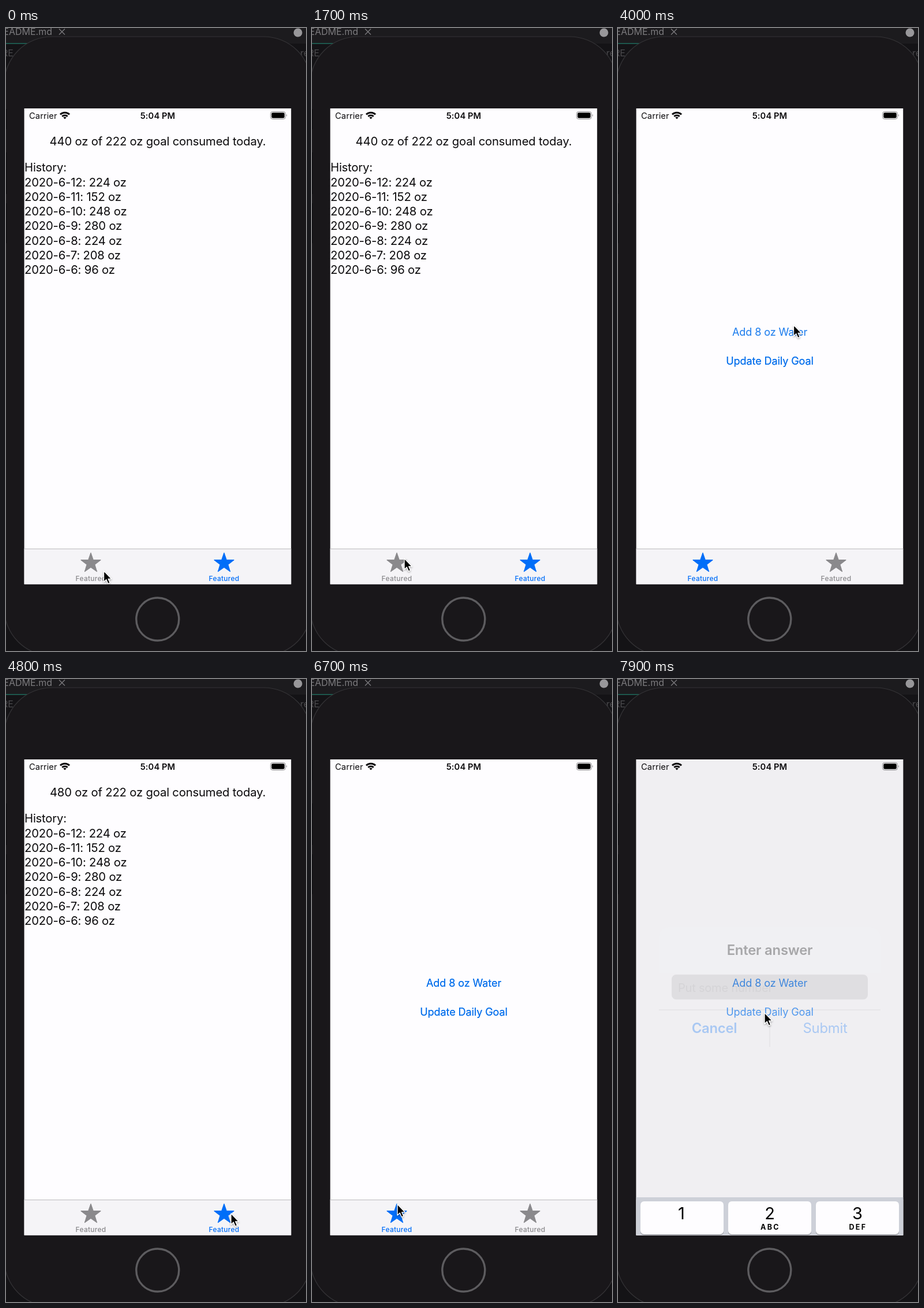
Animation, 520 px wide and 1077 px high, one loop 8 s. Source, as an HTML page:

```html
<!DOCTYPE html>
<html lang="en">
<head>
<meta charset="utf-8">
<title>Water tracker</title>
<style>
  html, body { margin: 0; width: 100%; height: 100%; overflow: hidden; background: #19181b; }
  svg { display: block; width: 520px; height: 1077px; font-family: Inter, Roboto, "Liberation Sans", sans-serif; }
  .body { font-size: 20.3px; letter-spacing: -.19px; fill: #0b0a0c; }
  .mid { text-anchor: middle; }
  .button { font-size: 18.1px; letter-spacing: -.12px; fill: #0a72ec; }
  .status { font-size: 14.7px; letter-spacing: .08px; fill: #0b0a0c; }
  .tab text { font-size: 12px; font-weight: 500; letter-spacing: .25px; }
  .editor { font-size: 16px; }
  .alert text { font-size: 23.8px; letter-spacing: -.2px; }
  .strong { font-weight: 600; }
  .digit { font-size: 29px; }
  .letters { font-size: 12.5px; font-weight: 700; letter-spacing: 2.4px; }
</style>
</head>
<body>
<svg viewBox="0 0 520 1077">
  <defs>
    <filter id="soft" x="-60%" y="-40%" width="240%" height="200%">
      <feDropShadow dx="0" dy="1.5" stdDeviation="1.4" flood-opacity=".35"/>
    </filter>
    <clipPath id="screen"><rect x="31.6" y="139" width="462.6" height="822.4"/></clipPath>
  </defs>

  <!-- editor behind the phone -->
  <rect width="520" height="1077" fill="#141316"/>
  <rect width="520" height="27" fill="#1c1b1e"/>
  <rect y="26" width="40" height="1.5" fill="#1f6a5c"/>
  <g class="editor">
    <text x="80" y="12" text-anchor="end" fill="#7c7b7e">README.md</text>
    <text x="-7" y="49" fill="#4b4a4d">RE</text>
    <text x="510" y="49" fill="#4b4a4d">re</text>
  </g>
  <path d="M92 1.5l10 10m0-10l-10 10" stroke="#7c7b7e" stroke-width="1.3"/>
  <circle cx="506" cy="8" r="7.5" fill="#98979a"/>

  <!-- phone -->
  <rect x="-3" y="15" width="532" height="1070" rx="82" fill="#19171a" stroke="#343336" stroke-width="1.2"/>
  <path d="M.5 140v35M.5 215v72M.5 303v69" stroke="#0d0c0f" stroke-width="1.5"/>
  <circle cx="262.8" cy="1022" r="37" fill="none" stroke="#5d5c5f" stroke-width="3.4"/>

  <g clip-path="url(#screen)">
    <rect x="31" y="139" width="464" height="823" fill="#fefdff"/>
    <g id="history">
      <text id="total" class="body mid" x="263" y="203.3"></text>
    </g>
    <g id="actions" class="button mid">
      <text id="add" x="263" y="532.3">Add 8 oz Water</text>
      <text id="goal" x="263" y="581.5">Update Daily Goal</text>
    </g>
    <rect x="31" y="900" width="464" height="62" fill="#f5f4f7"/>
    <rect x="31" y="900" width="464" height="1" fill="#bbbabd"/>
    <g id="tabs"></g>

    <g id="modal">
      <rect x="31" y="139" width="464" height="823" fill="#f0eff2"/>
      <use href="#actions"/>
      <g class="alert" opacity=".3">
        <rect x="71" y="429" width="384" height="207" rx="16" fill="#f1f0f3"/>
        <rect x="93" y="511" width="340" height="43" rx="8" fill="#b9b8bb"/>
        <text class="mid strong" x="263" y="476.5">Enter answer</text>
        <text x="104" y="540.5" style="font-size:20px" fill="#98979a">Put some number</text>
        <path d="M71 572H455M263 572V636" stroke="#b9b8bb"/>
        <g class="mid" fill="#0a72f8">
          <text class="strong" x="167" y="612">Cancel</text>
          <text x="359" y="612">Submit</text>
        </g>
      </g>
      <rect x="31" y="896" width="464" height="66" fill="#cdd0d8"/>
      <g id="keys" class="mid"></g>
    </g>

    <!-- status bar -->
    <text class="status" x="40" y="157">Carrier</text>
    <text class="status mid strong" x="263" y="157">5:04 PM</text>
    <g id="wifi" fill="none" stroke="#0b0a0c" stroke-width="3"></g>
    <rect x="458.5" y="144.5" width="26" height="13" rx="3.8" fill="none" stroke="#8b8a8d"/>
    <rect x="460.2" y="146.2" width="22.6" height="9.6" rx="2.4" fill="#000"/>
    <path d="M486 149q2 2 0 4.2z" fill="#8b8a8d"/>
  </g>

  <g id="cursor" filter="url(#soft)">
    <path d="M0 0V19L4.3 15L7.3 22L10.6 20.6L7.6 13.8H13.3Z" fill="#000" stroke="#fff" stroke-width="1.3" stroke-linejoin="round"/>
  </g>
</svg>
<script>
const LOOP = 8000, STEP = 100;
const BLUE = '#006ef8', GRAY = '#8a898c';
const $ = id => document.getElementById(id);

function make(parent, tag, attrs, text = '') {
  const el = document.createElementNS('http://www.w3.org/2000/svg', tag);
  for (const key in attrs) el.setAttribute(key, attrs[key]);
  el.textContent = text;
  return parent.appendChild(el);
}

['History:', '2020-6-12: 224 oz', '2020-6-11: 152 oz', '2020-6-10: 248 oz', '2020-6-9: 280 oz',
 '2020-6-8: 224 oz', '2020-6-7: 208 oz', '2020-6-6: 96 oz'].forEach((line, i) =>
  make($('history'), 'text', { class: 'body', x: 32, y: 248.3 + i * 25.25 }, line));

function star(cx, cy, radius) {
  return Array.from({ length: 10 }, (_, i) => {
    const a = i * Math.PI / 5, r = i % 2 ? radius * .4 : radius;
    return `${cx + r * Math.sin(a)},${cy - r * Math.cos(a)}`;
  }).join(' ');
}

const tabs = [147, 378].map(x => {
  const tab = make($('tabs'), 'g', { class: 'tab mid' });
  make(tab, 'polygon', { points: star(x, 925.2, 17.8), stroke: 'currentColor', 'stroke-width': 1.2, 'stroke-linejoin': 'round', fill: 'currentColor' });
  make(tab, 'text', { x, y: 956.2, fill: 'currentColor' }, 'Featured');
  return tab;
});

['', 'ABC', 'DEF'].forEach((letters, i) => {
  const x = 39 + i * 152, keys = $('keys');
  make(keys, 'rect', { x, y: 904.3, width: 144, height: 57, rx: 6, fill: '#898b90' });
  make(keys, 'rect', { x, y: 903, width: 144, height: 57, rx: 6, fill: '#fefdff' });
  make(keys, 'text', { class: 'digit', x: x + (i ? 72 : 71), y: 933.5 }, i + 1);
  make(keys, 'text', { class: 'letters', x: x + 73, y: 951.5 }, letters);
});

[11.3, 6.6, 1.9].forEach(r => {
  const d = r * Math.SQRT1_2;
  make($('wifi'), 'path', { d: `M${102 - d} ${157.5 - d}A${r} ${r} 0 0 1 ${102 + d} ${157.5 - d}`, 'stroke-width': r < 3 ? 3.8 : 3 });
});

// time, x, y of the pointer tip
const path = [
  [200, 169.5, 938.5], [500, 70, 560], [700, 78, 206], [1000, 440, 206], [1200, 440, 210],
  [1400, 300, 500], [1700, 160, 917], [2100, 160, 917], [2700, 304.5, 513.5], [4200, 304.5, 513.5],
  [4700, 390, 924], [4900, 390, 924], [5600, 101, 160], [5700, 101, 143], [5900, 84, 190],
  [6100, 90, 208], [6500, 148, 908], [6900, 148, 908], [7500, 254, 577]
];

function pointer(t) {
  const next = path.findIndex(p => p[0] > t);
  if (next === 0) return path[0].slice(1);
  if (next < 0) return path[path.length - 1].slice(1);
  const [t0, x0, y0] = path[next - 1], [t1, x1, y1] = path[next];
  const u = (t - t0) / (t1 - t0), e = u * u * (3 - 2 * u);
  return [x0 + (x1 - x0) * e, y0 + (y1 - y0) * e];
}

const addTaps = [3000, 3300, 3600, 3900, 4200], goalTaps = [7700];
const tapFade = (taps, t) => {
  const last = taps.filter(s => t >= s).pop();
  return last === undefined ? 1 : Math.min(1, .3 + (t - last) / 300);
};
const show = (id, on) => $(id).setAttribute('visibility', on ? 'visible' : 'hidden');

function draw(t) {
  const actions = (t >= 2000 && t < 4800) || t >= 6600;
  show('history', !actions);
  show('actions', actions);
  show('modal', t >= 7900);
  $('total').textContent = `${t < 4800 ? 440 : 480} oz of 222 oz goal consumed today.`;
  $('add').setAttribute('opacity', tapFade(addTaps, t));
  $('goal').setAttribute('opacity', t < 7900 ? tapFade(goalTaps, t) : 1);
  tabs.forEach((tab, i) => tab.setAttribute('color', (i === 0) === actions ? BLUE : GRAY));
  $('cursor').setAttribute('transform', `translate(${pointer(t)})`);
}

const start = performance.now();
function tick() {
  const t = (performance.now() - start) % LOOP;
  draw(Math.floor(t / STEP) * STEP);
  requestAnimationFrame(tick);
}
tick();
</script>
</body>
</html>
```
